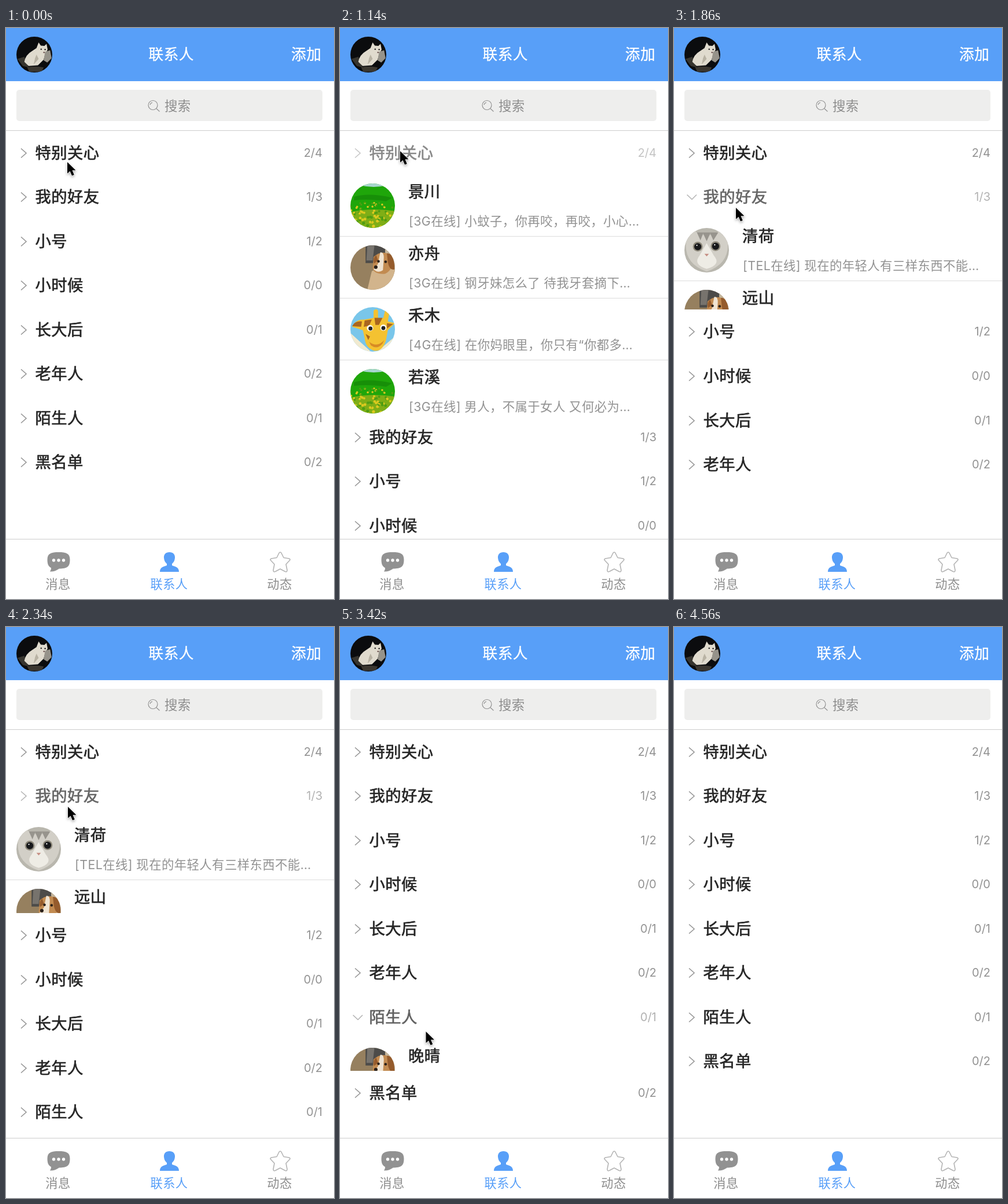
An HTML page for the animation above (4.68 s loop, 567 by 988 pixels).

```html
<!DOCTYPE html>
<html lang="zh-CN">
<head>
<meta charset="utf-8">
<style>
  html, body { margin: 0; width: 100%; height: 100%; overflow: hidden; background: #fff; }
  body { position: relative; font: 27.3px Inter, "Noto Sans CJK SC", "Noto Sans CJK", sans-serif; letter-spacing: .45px; color: #262626; white-space: nowrap; }
  body > *, .item > *, .row > * { position: absolute; }
  svg { display: block; overflow: visible; }
  .avatar { border-radius: 50%; overflow: hidden; }
  header { left: 0; top: 0; width: 567px; height: 92px; background: #589ff8; color: #fff; font-size: 25.7px; line-height: 92px; -webkit-text-stroke: .35px; }
  header > * { position: absolute; top: 0; }
  .search { left: 18px; top: 107px; width: 529px; height: 54px; border-radius: 5px; background: #eeeeed; color: #8d8d8d; font-size: 22.4px; line-height: 55px; text-indent: 256px; }
  .list { left: 0; top: 176.5px; width: 567px; height: 707px; border-top: 1.2px solid #ccc; overflow: hidden; }
  .row { position: relative; height: 76.57px; line-height: 77px; }
  .row b, .item b { font-weight: 400; -webkit-text-stroke: .7px; }
  .row b { left: 50.5px; }
  .row i { right: 20px; font: 400 20px/77px Inter, sans-serif; letter-spacing: 0; color: #929292; }
  .panel { overflow: hidden; }
  .item { position: relative; height: 107.1px; box-sizing: border-box; border-bottom: 1px solid #dcdcdc; }
  .item:last-child { border-color: transparent; }
  .item .avatar { left: 18px; top: 15px; }
  .item b { left: 118px; top: 10px; line-height: 40px; }
  .item span { left: 119px; top: 60px; font-size: 21.4px; letter-spacing: .4px; line-height: 40px; color: #929292; }
  nav { left: 0; top: 883.5px; width: 567px; height: 104.5px; border-top: 1.4px solid #ccc; background: #fff; box-sizing: border-box; }
  nav span { position: absolute; top: 57px; width: 120px; text-align: center; font-size: 21.2px; line-height: 40px; color: #8d8d8d; }
  #icons, #cursor { left: 0; top: 0; }
  #cursor { filter: drop-shadow(0 2px 2px #0005); }
</style>
</head>
<body>
<header>
  <div id="me" style="left:18px;top:15px"></div>
  <span style="left:246.5px">联系人</span>
  <span style="left:493px">添加</span>
</header>
<div class="search">搜索</div>
<div class="list"></div>
<nav>
  <span style="left:30px">消息</span>
  <span style="left:222px;color:#589ff8">联系人</span>
  <span style="left:413px">动态</span>
</nav>
<svg id="icons" width="567" height="988" fill="none">
  <g stroke="#929292" stroke-width="1.2"><circle cx="254" cy="133.500" r="8"/><path d="M249 133a5 5 0 0 1 4-4M260 139.500l5.500 5"/></g>
  <path fill="#929292" d="M91 907C104 907 110.500 909 110.500 920C110.500 932 106 935.500 92 935.500C87 939 82 941 76 940.500Q78.500 937 78 934C73.500 932 71.500 928 71.500 920C71.500 909 78 907 91 907Z"/>
  <g fill="#fff"><circle cx="82.500" cy="921" r="2.700"/><circle cx="91" cy="921" r="2.700"/><circle cx="99.500" cy="921" r="2.700"/></g>
  <path fill="#589ff8" d="M282.500 907C289 907 292.500 911 292 917C291.500 922 289.500 925 287 927V930C293 932 299 933 299 941H266C266 933 272 932 278 930V927C275.500 925 273.500 922 273 917C272.500 911 276 907 282.500 907Z"/>
  <path stroke="#b4b4b4" stroke-width="1.600" stroke-linejoin="round" d="M472 908.500Q474 905.500 476 908.500L480 916.500L489 918Q492.500 919 490 921.500L484 928L486 938Q486 942 482.500 940.500L474 936L465.500 940.500Q462 942 462 938L464 928L458 921.500Q455.500 919 459 918L468 916.500Z"/>
</svg>
<svg id="cursor" width="20" height="30"><path d="M0 0V19.800L4.600 15.700L8 23.600L11.800 22L8.500 14.300H14.500Z" fill="#000" stroke="#fff" stroke-width="1.400" paint-order="stroke"/></svg>
<script>
const LOOP = 4680, STEP = 60, FOLD = 300, ITEM = 107.1, ROW = 76.57, VIEW = 706;

const dot = (x, y, r, fill) => `<circle cx="${x}" cy="${y}" r="${r}" fill="${fill}"/>`;
const shape = (d, fill) => `<path d="${d}" fill="${fill}"/>`;
const back = fill => shape('M0 0H100V100H0Z', fill);
const random = n => Math.abs(Math.sin(n * 127.1) * 43758.5453) % 1;

function flowers() {
  let out = '';
  for (let i = 0; i < 90; i++) {
    const y = 42 + 58 * random(i + 200);
    out += dot(100 * random(i), y, 1 + y / 40, i % 2 ? '#ddc91f' : '#4f9d12');
  }
  return out;
}

const pictures = {
  field: back('#1fa60a') + shape('M20 0H80V5Q50 11 20 4Z', '#a9d6cf') +
    shape('M8 30Q40 20 94 32L80 40Q40 34 8 38Z', '#178f08') +
    shape('M0 64Q50 54 100 62V100H0Z', '#7fae16') + flowers(),
  dog: back('#96805f') + shape('M34 0H80V40H34Z', '#4c4b49') + shape('M38 0H54L50 34H36Z', '#77736d') +
    shape('M78 0H100V60H78Z', '#c4b59b') + shape('M48 58Q74 45 100 55V100H38Z', '#d2b48c') +
    shape('M52 26Q72 8 93 24Q99 54 78 64Q54 66 50 52Z', '#c28b51') +
    shape('M67 16Q75 14 75 28L73 56Q62 64 52 54L62 42Z', '#f0e4d2') +
    shape('M82 18Q99 18 99 54Q88 58 84 38Z', '#955b2c') + shape('M58 22Q50 28 53 41L62 34Z', '#955b2c') +
    dot(63, 36, 3, '#2a2019') + dot(79, 37, 3, '#2a2019') + dot(57, 49, 4, '#2a2019'),
  giraffe: back('#79c6ea') + shape('M0 58L46 100H0ZM60 100L100 66V100Z', '#f1ead0') +
    shape('M52 8Q58 2 62 8L62 26L74 24L78 6Q84 2 88 8L84 32L100 36L84 52L80 74Q72 100 54 98Q34 92 32 70L28 52L4 44Q12 26 32 28L52 24Z', '#f4c231') +
    shape('M54 24H72L64 40H56ZM32 30L48 28L42 42L30 44ZM4 43Q10 30 26 32L24 44ZM82 36L96 38L82 48ZM34 60L44 66L40 74Z', '#a9661f') +
    dot(44, 47, 7, '#fff') + dot(74, 46, 7, '#fff') + dot(45, 48, 4.5, '#222') + dot(74, 47, 4.5, '#222') +
    shape('M42 78Q60 92 76 74L72 82Q60 96 46 86Z', '#d88a24'),
  cat: back('#b9b7ae') + shape('M4 30L14 2L38 16H64L86 2L97 30Q102 80 50 98Q-2 80 4 30Z', '#d2cfc7') +
    shape('M28 10L36 28L42 12L50 30L58 12L65 28L76 10Z', '#97948d') +
    shape('M50 34L66 62Q84 82 50 92Q18 82 34 62Z', '#eeece5') +
    dot(30, 42, 11, '#8f8a7c') + dot(70, 41, 11, '#8f8a7c') + dot(30, 42, 8, '#17181a') + dot(70, 41, 8, '#17181a') +
    dot(28, 39, 1.5, '#fff') + dot(68, 38, 1.5, '#fff') + shape('M45 58H55L50 64Z', '#c58e83'),
  night: back('#0b0c0e') + shape('M3 62L22 56L34 86L18 82Z', '#37352f') +
    shape('M62 16L68 25L78 26L84 20L87 36L80 50L76 64L60 80L34 82L22 70Q26 50 44 40L56 32Z', '#e0dbce') +
    shape('M80 42L94 38L98 60L86 72L76 66Z', '#96938a') + shape('M30 86Q50 80 76 86L70 98H36Z', '#3b3730') +
    shape('M56 50L62 62L48 78L52 60Z', '#b9b3a4') +
    dot(69, 35, 2, '#222') + dot(80, 36, 2, '#222') + dot(77, 44, 2, '#6b5350')
};
const avatar = (kind, size) =>
  `<svg class="avatar" width="${size}" height="${size}" viewBox="0 0 100 100">${pictures[kind]}</svg>`;

// name, count, contacts [picture, name, status], time of opening, time of closing
const groups = [
  ['特别关心', '2/4', [
    ['field', '景川', '[3G在线] 小蚊子，你再咬，再咬，小心…'],
    ['dog', '亦舟', '[3G在线] 钢牙妹怎么了 待我牙套摘下…'],
    ['giraffe', '禾木', '[4G在线] 在你妈眼里，你只有“你都多…'],
    ['field', '若溪', '[3G在线] 男人，不属于女人 又何必为…']], 420, 1137],
  ['我的好友', '1/3', [
    ['cat', '清荷', '[TEL在线] 现在的年轻人有三样东西不能…'],
    ['dog', '远山', '[3G在线] 今天的天气真好，出去走走…'],
    ['field', '晓棠', '[4G在线] 慢慢来，一切都会好起来…']], 1800, 2280],
  ['小号', '1/2'], ['小时候', '0/0'], ['长大后', '0/1'], ['老年人', '0/2'],
  ['陌生人', '0/1', [['dog', '晚晴', '[3G在线] 你好，很高兴认识你…']], 3356, 3930],
  ['黑名单', '0/2']
];

// time, x, y of the pointer tip
const pointer = [
  [0, 106, 232], [360, 104, 213], [1190, 104, 213], [1680, 107, 311],
  [2490, 107, 311], [3190, 148.5, 700], [3980, 148.5, 700], [4440, 165, 998]
];

const clamp = p => Math.min(1, Math.max(0, p));
const easeOut = p => 1 - (1 - clamp(p)) ** 3;
const smooth = p => (p = clamp(p), p * p * (3 - 2 * p));

document.querySelector('#me').innerHTML = avatar('night', 62);
document.querySelector('.list').innerHTML = groups.map(([name, count, contacts = []]) => `
  <div class="row"><svg width="60" height="77" fill="none" stroke="#929292" stroke-width="1.5"><path/></svg><b>${name}</b><i>${count}</i></div>
  <div class="panel">${contacts.map(([kind, who, status]) =>
    `<div class="item">${avatar(kind, 77)}<b>${who}</b><span>${status}</span></div>`).join('')}</div>`).join('');
const rows = document.querySelectorAll('.row');
const panels = document.querySelectorAll('.panel');
const cursor = document.querySelector('#cursor');

// dims a row while it is pressed and lets it recover after release
const dim = (t, at) => smooth((t - at + 120) / 120) - smooth((t - at) / 150);

function draw(t) {
  let restTop = 0; // rows that will come to rest below the view vanish at once
  groups.forEach(([, , contacts = [], open = Infinity, close = Infinity], i) => {
    const isOpen = t >= open && t < close;
    const part = easeOut((t - open) / FOLD) - easeOut((t - close) / FOLD);
    panels[i].style.height = contacts.length * ITEM * part + 'px';
    rows[i].style.opacity = 1 - .46 * (dim(t, open) + dim(t, close));
    rows[i].style.visibility = restTop < VIEW ? 'visible' : 'hidden';
    rows[i].querySelector('path').setAttribute('d', isOpen ? 'M22.5 34.5L31 42.5L39 34.5' : 'M26 30.5L35 38.5L26 46.5');
    restTop += ROW + (isOpen ? contacts.length * ITEM : 0);
  });
  const next = pointer.findIndex(k => k[0] > t);
  const [t1, x1, y1] = pointer.at(next);
  const [t0, x0, y0] = pointer.at(next < 0 ? -1 : next - 1);
  const p = t1 > t0 ? smooth((t - t0) / (t1 - t0)) : 1;
  cursor.style.transform = `translate(${x0 + (x1 - x0) * p}px, ${y0 + (y1 - y0) * p}px)`;
}

const start = performance.now();
function tick() {
  const t = (performance.now() - start) % LOOP;
  draw(Math.min(LOOP - 2 * STEP, Math.floor(t / STEP) * STEP));
  requestAnimationFrame(tick);
}
tick();
</script>
</body>
</html>
```
